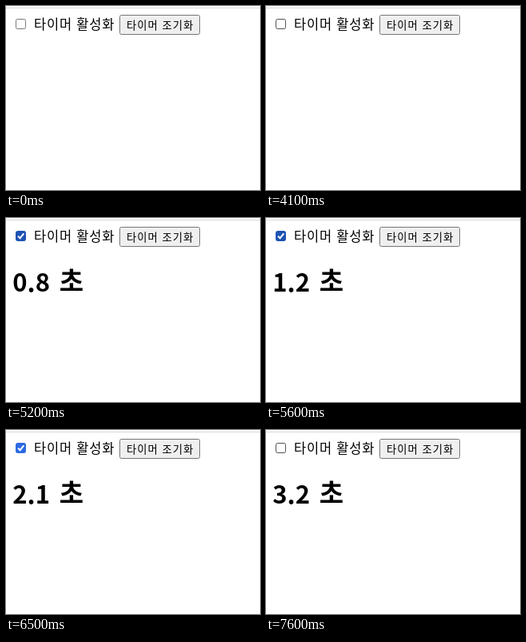
Recreate the animation shown at these times as an HTML page. Size 318 px wide and 230 px high, loop 8 s.

```html
<!DOCTYPE html>
<html lang="ko">
<head>
<meta charset="utf-8">
<title>타이머</title>
<style>
  html, body { margin: 0; width: 100%; height: 100%; overflow: hidden; background: #fff; }
  svg { display: block; width: 100%; height: 100%; }
  text { font-family: "Noto Sans CJK KR", "Noto Sans CJK", "Noto Sans CJK JP", sans-serif; fill: #000; }
  .label { font-size: 16.5px; font-weight: 300; letter-spacing: .8px; }
  .button { font-size: 13.3px; font-weight: 300; letter-spacing: 1px; }
  .digits { font-size: 31px; font-weight: 700; }
  .unit { font-size: 33px; font-weight: 700; }
</style>
</head>
<body>
<svg viewBox="0 0 318 230">
  <rect width="318" height="230" fill="#fff"/>
  <rect y="2" width="318" height="1" fill="#d8d8d8"/>

  <rect id="box" x="12.5" y="16.5" width="12" height="12" rx="2"/>
  <path id="tick" d="M15 22.6 L17.6 25.2 L22.3 19.4" fill="none" stroke="#fff" stroke-width="2"/>
  <text class="label" x="35" y="29">타이머 활성화</text>

  <rect x="142.5" y="11.5" width="100" height="24" rx="2" fill="#efefef" stroke="#767676"/>
  <text class="button" x="151" y="28.7">타이머 조기화</text>

  <g id="clock">
    <text id="digits" class="digits" x="8.3" y="92"></text>
    <text class="unit" x="66.7" y="91">초</text>
  </g>
</svg>
<script>
  const LOOP = 8000, STEP = 100;
  const CHECK = 4400, UNCHECK = 7600;
  const HOVERS = [[4100, 5700], [7300, LOOP]];
  const $ = id => document.getElementById(id);
  const box = $('box'), tick = $('tick'), clock = $('clock'), digits = $('digits');
  const show = (el, on) => el.setAttribute('visibility', on ? 'visible' : 'hidden');

  function draw(t) {
    const hover = HOVERS.some(([from, to]) => t >= from && t < to);
    const checked = t >= CHECK && t < UNCHECK;
    const blue = hover ? '#1e53b2' : '#2c69e2';
    box.setAttribute('fill', checked ? blue : '#fff');
    box.setAttribute('stroke', checked ? blue : hover ? '#4f4f4f' : '#767676');
    show(tick, checked);

    // The count stops when the box is cleared.
    const tenths = Math.floor((Math.min(t, UNCHECK) - CHECK) / STEP);
    show(clock, tenths >= 0);
    digits.textContent = (Math.max(tenths, 0) / 10).toFixed(1);
  }

  const start = performance.now();
  function frame() {
    draw((performance.now() - start) % LOOP);
    requestAnimationFrame(frame);
  }
  frame();
</script>
</body>
</html>
```
